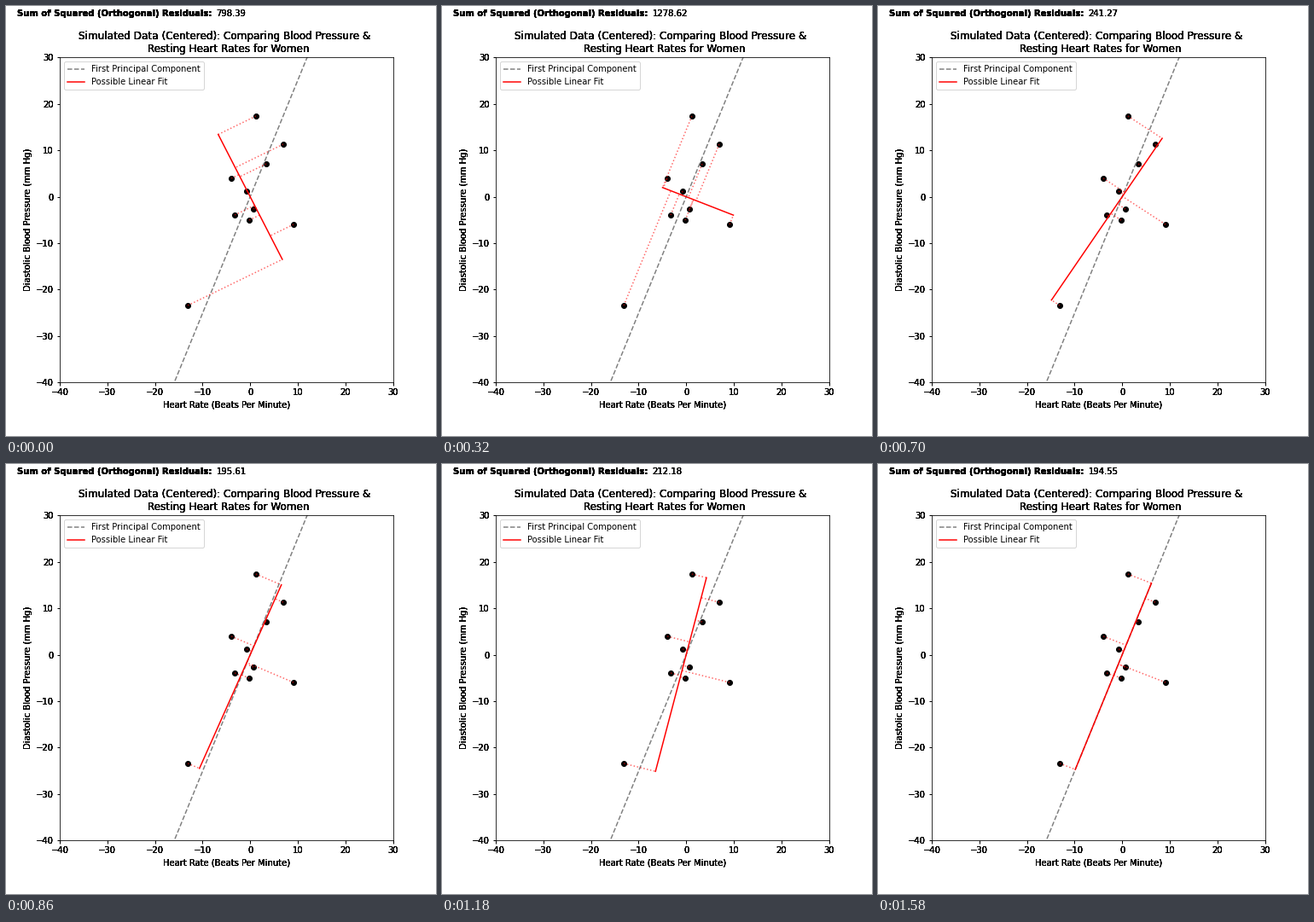
Animation, 504 px wide and 504 px high, one loop 1850 ms. Source, as a matplotlib script:

```python
import numpy as np
import matplotlib.pyplot as plt
from matplotlib.animation import FuncAnimation

plt.rcParams["font.family"] = "DejaVu Sans"

STEP_MS = 20
LOOP_MS = 1850
TICK_MS = 10

x = np.array([1.2, 6.94, 3.37, -3.97, -0.75, 0.68, -3.25, -0.21, 9.11, -13.11])
y = np.array([17.39, 11.32, 7.09, 3.97, 1.2, -2.66, -3.94, -5.05, -5.97, -23.44])

# Sums of squares and cross products of the unrounded data
SXX, SYY, SXY = 342.8675, 1130.3091, 372.5412
gap = SYY - SXX
pc_slope = (gap + np.hypot(gap, 2 * SXY)) / (2 * SXY)

# Sweep upwards past the best slope, then settle back on it
slopes = np.concatenate([-2 + 0.1 * np.arange(60), np.linspace(4, pc_slope, 20)])


def residual_sum(m):
    return (SYY + m * m * SXX - 2 * m * SXY) / (1 + m * m)


def heavy(text, layers=5):
    """Draw a text several times so that its soft edges turn hard."""
    draw = text.draw

    def draw_layers(renderer):
        for _ in range(layers):
            draw(renderer)

    text.draw = draw_layers
    return text


fig = plt.figure(figsize=(7, 7), dpi=72, facecolor="white")
fig.subplots_adjust(left=0.125, right=0.9, bottom=0.125, top=0.88)
ax = fig.add_subplot()
ax.set_xlim(-40, 30)
ax.set_ylim(-40, 30)
ax.set_xticks(range(-40, 31, 10))
ax.set_yticks(range(-40, 31, 10))
ax.tick_params(width=1)

ax.scatter(x, y, s=36, color="black", zorder=1)
pc_x = np.array([-15.8, 14])
ax.plot(pc_x, pc_slope * pc_x, "--", color="gray", label="First Principal Component")
residuals = [ax.plot([], [], ":", color="red", alpha=0.6)[0] for _ in x]
fit, = ax.plot([], [], color="red", label="Possible Linear Fit")
ax.legend(loc="upper left")

ax.set_title("Simulated Data (Centered): Comparing Blood Pressure & \n"
             " Resting Heart Rates for Women")
ax.set_xlabel("Heart Rate (Beats Per Minute)")
ax.set_ylabel("Diastolic Blood Pressure (mm Hg)")
caption = ax.text(-49, 39, "Sum of Squared (Orthogonal) Residuals:", weight="bold")
value = ax.text(-7.13, 39, "")

for text in [ax.title, ax.xaxis.label, ax.yaxis.label, caption, value,
             *ax.get_xticklabels(), *ax.get_yticklabels()]:
    heavy(text)


def update(i):
    m = slopes[min(i * TICK_MS // STEP_MS, len(slopes) - 1)]
    foot_x = (x + m * y) / (1 + m * m)
    for line, px, py, fx in zip(residuals, x, y, foot_x):
        line.set_data([px, fx], [py, m * fx])
    ends = np.array([foot_x.min(), foot_x.max()])
    fit.set_data(ends, m * ends)
    value.set_text(f"{residual_sum(m):.2f}")
    return [*residuals, fit, value]


anim = FuncAnimation(fig, update, frames=LOOP_MS // TICK_MS, interval=TICK_MS,
                     repeat=True, repeat_delay=0)
plt.show()
```
